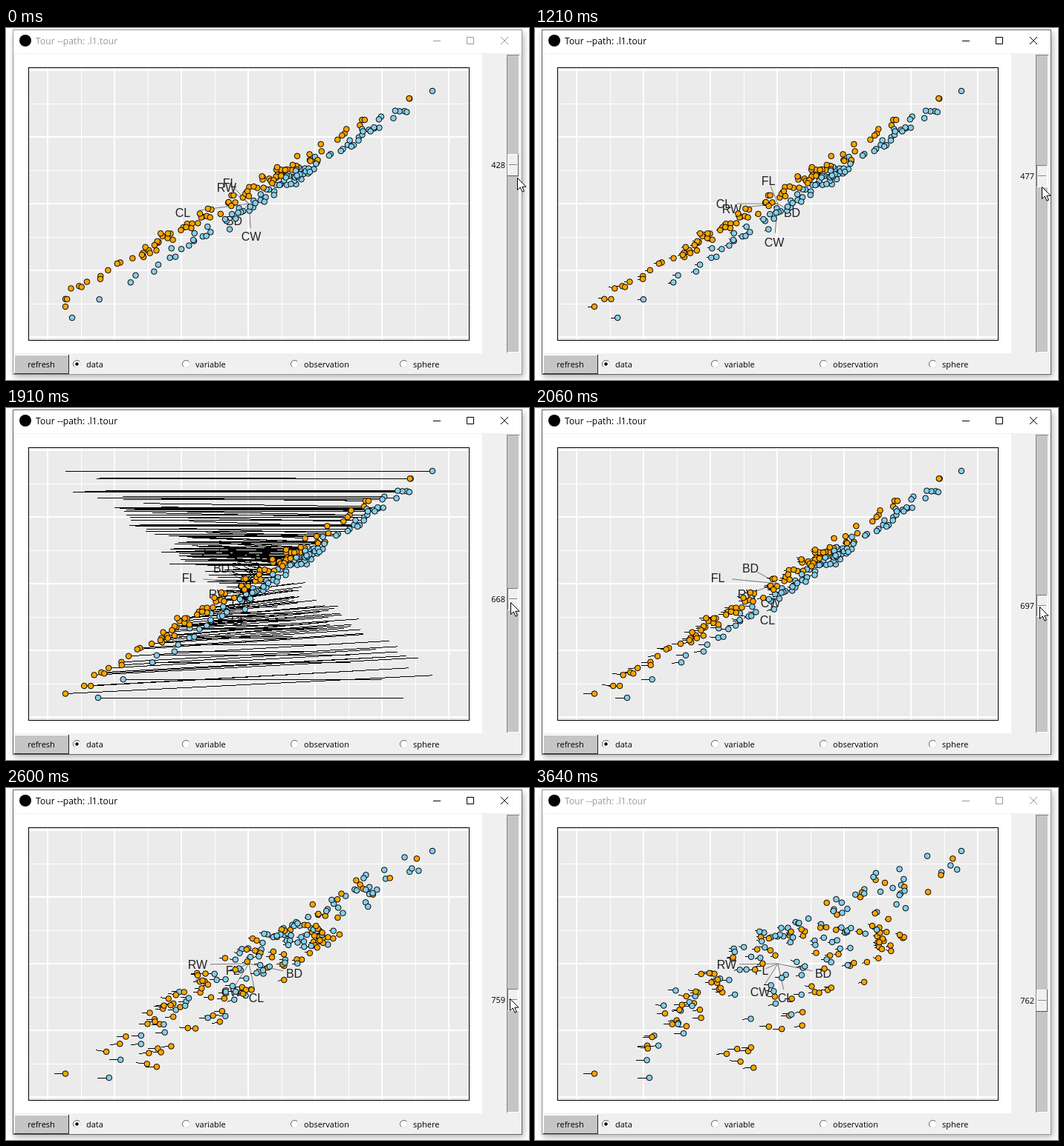
These frames come from a looping animation (704x475 px, 3740 ms). An HTML page:

```html
<!DOCTYPE html>
<html lang="en">
<head>
<meta charset="utf-8">
<title>Tour</title>
<style>
html, body { margin: 0; width: 100%; height: 100%; overflow: hidden; background: #fff; }
svg { display: block; width: 704px; height: 475px; }
text { font: 11px "Open Sans", "Noto Sans", sans-serif; fill: #000; }
#title { font-size: 12px; letter-spacing: .1px; }
#axes text { font: 16px "Liberation Sans", Arial, sans-serif; fill: #222; text-anchor: middle; }
#axes line { stroke: #777; }
#trails { stroke: #000; fill: none; }
#dots { stroke: #000; }
.crisp { shape-rendering: crispEdges; }
</style>
</head>
<body>
<svg viewBox="0 0 704 475">
  <defs><filter id="soft" x="-5%" y="-5%" width="110%" height="110%"><feGaussianBlur stdDeviation="4"/></filter></defs>
  <rect x="11" y="6" width="686" height="465" opacity=".3" filter="url(#soft)"/>
  <rect x="9.5" y="2.5" width="685" height="465" fill="#f0f0f0" id="frame"/>
  <rect x="10" y="3" width="684" height="31" fill="#fff"/>
  <circle cx="26" cy="17" r="8"/>
  <text id="title" x="40" y="22">Tour --path: .l1.tour</text>
  <path id="buttons" fill="none" d="M575 17.5h10M620.5 12.5h9v9h-9zM666 12l10 10M676 12l-10 10"/>
  <rect x="12" y="35" width="629" height="404" fill="#fff"/>
  <rect x="30.5" y="53.5" width="593" height="368" fill="#ebebeb"/>
  <g id="grid" stroke="#fff" class="crisp"></g>
  <g id="axes"></g>
  <path id="trails" class="crisp"/>
  <g id="dots"></g>
  <rect x="30.5" y="53.5" width="593" height="368" fill="none" stroke="#000"/>
  <g class="crisp" fill="none">
    <rect x="674" y="36" width="17" height="402" fill="#c5c5c5"/>
    <path d="M674.5 438V36.5H691" stroke="#858585"/>
    <path d="M690.5 37V437.5H675" stroke="#fff"/>
    <rect x="11" y="441" width="74" height="26" fill="#c5c5c5"/>
    <path d="M11.5 466V441.5H84" stroke="#fff"/>
    <path d="M84.5 441V466.5H11" stroke="#222"/>
  </g>
  <g id="thumb" class="crisp" fill="none">
    <rect x="675" y="-15" width="15" height="30" fill="#f0f0f0"/>
    <path id="lit" d="M675.5 14V-14.5H689"/>
    <path id="shade" d="M689.5 -15V14.5H675"/>
    <path d="M677 -.5H688" stroke="#808080"/>
    <path d="M677 .5H688" stroke="#fff"/>
  </g>
  <text id="value" x="672" text-anchor="end"></text>
  <text x="47.5" y="458" text-anchor="middle">refresh</text>
  <g id="radios"></g>
  <path id="cursor" d="M.5 .5V16.5L4.3 13L7 19.2L9.4 18.2L6.8 12.2H12Z" fill="#fff" stroke="#000"/>
</svg>
<script>
const LOOP = 3740, SVG = 'http://www.w3.org/2000/svg';
const PRESS = 670, FLIP = 1670, UNFLIP = 1910, SPLIT = 2300, LEAVE = 3080, BLUR = 3640;

// Moments at which the window repaints
const STEPS = [0, 120, 270, PRESS, 790, 940, 1060, 1210, 1370, 1520, FLIP, 1790,
  UNFLIP, 2060, 2180, SPLIT, 2460, 2600, 2720, 2840, 2960, LEAVE, BLUR];

// time, slider value, pointer x, pointer y
const DRAG = [
  [0, 428, 688, 202], [120, 428, 688, 196], [270, 428, 682, 181], [PRESS, 428, 682, 190],
  [1210, 477, 682, 214], [FLIP, 584, 679, 247], [UNFLIP, 668, 679, 262],
  [SPLIT, 743, 678, 278], [2600, 759, 678, 284], [LEAVE, 762, 676, 426]
];

// Key times of the labels and the pose reached at each
const POSES = [[PRESS, 0], [1210, 1], [UNFLIP, 2], [SPLIT, 2], [2600, 3]];
const LABELS = {
  FL: [[301, 209], [314, 206], [246, 229], [305, 246]],
  RW: [[297, 215], [265, 244], [286, 251], [258, 238]],
  CL: [[238, 249], [254, 237], [313, 286], [337, 283]],
  BD: [[307, 260], [346, 249], [290, 216], [388, 250]],
  CW: [[330, 281], [322, 289], [317, 263], [303, 275]]
};

// rank, height pairs for the two colours
const HEIGHTS = [
  [[0, 85], [2, 111], [22, 160], [32, 190], [55, 208], [78, 256], [91, 300], [97, 340], [99, 391]],
  [[0, 95], [1, 125], [9, 165], [18, 188], [40, 212], [70, 277], [86, 305], [95, 352], [99, 376]]
];

const $ = id => document.getElementById(id);
const clamp = (v, lo, hi) => Math.min(hi, Math.max(lo, v));
const lerp = (a, b, k) => a + (b - a) * k;
const ramp = (t, from, to) => clamp((t - from) / (to - from), 0, 1);

function set(el, attrs) {
  for (const k in attrs) el.setAttribute(k, attrs[k]);
}
function add(parent, tag, attrs, text) {
  const el = document.createElementNS(SVG, tag);
  set(el, attrs);
  if (text) el.textContent = text;
  return parent.appendChild(el);
}

// Linear interpolation in rows whose first entry is the position
function along(rows, t) {
  const i = clamp(rows.findIndex(r => r[0] >= t), -1, rows.length);
  if (i === 0) return rows[0];
  if (i < 0) return rows[rows.length - 1];
  const k = ramp(t, rows[i - 1][0], rows[i][0]);
  return rows[i].map((v, j) => lerp(rows[i - 1][j], v, k));
}

let seed = 29;
const rand = () => (seed = (seed * 16807) % 2147483647) / 2147483647;
const gauss = () => (rand() + rand() + rand() - 1.5) * 2;

const points = [];
HEIGHTS.forEach((heights, c) => {
  for (let i = 0; i < 100; i++) {
    const y = along(heights, i)[1];
    const g = rand() < .5 ? 0 : (c ? 1 : .75) + gauss() * .12;
    const p = { c, y, h: (y - 85) / 306, g, n: gauss(), m: gauss(), order: rand() };
    // The extremes span the plot exactly
    if (i === 0 || i === 99) Object.assign(p, { g: 0, m: 0, n: i && c ? -6 : 0 });
    points.push(p);
  }
});
points.sort((a, b) => a.order - b.order);

function place({ c, y, h, g, n, m }, t) {
  const flipped = t >= FLIP && t < UNFLIP;
  const split = 1 - (1 - ramp(t, SPLIT, LEAVE)) ** 1.4;
  let x, noise = 6 + 9 * split, shift = t < FLIP ? 0 : 10;
  if (flipped) {
    const twist = t < 1790 ? 1 : .1;
    x = 80 + 455 * h + c * (30 + 45 * h) - twist * g * (420 - 230 * h) * h;
    noise = -14;
    shift = -16;
  } else {
    const slope = 485 - 35 * ramp(t, PRESS, 1520);
    const line = 574 - slope * h - c * (14 + 45 * h);
    const bands = 574 - (800 - 380 * h) * h + c * (15 - 30 * h) + g * (10 + (440 - 350 * h) * h);
    x = lerp(line, bands, split);
  }
  return [clamp(x + n * noise, 80, 574), clamp(y + c * shift * h + m * (3 + 4 * split), 85, 391)];
}

for (let i = 0; i < 13; i++) {
  const x = 56 + 45 * i, y = 57 + 45 * i, w = i % 2 ? 1 : 2, o = i % 2 ? .5 : 0;
  add($('grid'), 'path', { d: `M${x + o} 54V421`, 'stroke-width': w });
  if (i < 9) add($('grid'), 'path', { d: `M31 ${y + o}H623`, 'stroke-width': w });
}
['data', 'variable', 'observation', 'sphere'].forEach((name, i) => {
  const x = 95.5 + Math.round(146.6 * i), g = $('radios');
  add(g, 'circle', { cx: x, cy: 453.5, r: 5, fill: '#fff', stroke: '#ddd' });
  add(g, 'path', { d: `M${x - 3.6} 457.1A5 5 0 0 1 ${x + 3.6} 449.9`, fill: 'none', stroke: '#666' });
  if (!i) add(g, 'circle', { cx: x, cy: 453.5, r: 2.2 });
  add(g, 'text', { x: x + 12.5, y: 458 }, name);
});
const axes = Object.entries(LABELS).map(([name, path]) => ({
  path,
  line: add($('axes'), 'line', { x1: 327, y1: 237 }),
  label: add($('axes'), 'text', {}, name)
}));
const dots = points.map(p => add($('dots'), 'circle', { r: 3.8, fill: p.c ? '#ffa500' : '#87ceeb' }));

function drawWindow(t) {
  const active = t >= PRESS && t < BLUR, ink = active ? '#000' : '#999';
  $('title').style.fill = ink;
  set($('buttons'), { stroke: ink });
  set($('frame'), { stroke: active ? '#666' : '#999' });

  const [, value, x, y] = along(DRAG, t);
  const mid = Math.round(185 + (value - 428) * .305);
  set($('thumb'), { transform: `translate(0 ${mid})` });
  set($('lit'), { stroke: active ? '#777' : '#fff' });
  set($('shade'), { stroke: active ? '#fff' : '#555' });
  set($('value'), { y: mid + 4 });
  $('value').textContent = Math.round(value);
  set($('cursor'), {
    transform: `translate(${Math.round(x)} ${Math.round(y)})`,
    visibility: t < LEAVE ? 'visible' : 'hidden'
  });
}

function drawAxes(t) {
  const pose = along(POSES, t)[1], i = Math.floor(pose), k = pose - i;
  for (const { path, line, label } of axes) {
    const to = path[Math.min(i + 1, 3)];
    const [x, y] = path[i].map((v, j) => lerp(v, to[j], k));
    set(line, { x2: lerp(327, x, .76), y2: lerp(237, y, .76) });
    set(label, { x, y: y + 6 });
  }
}

function drawPoints(t, last) {
  const jump = t >= FLIP && t <= UNFLIP;
  const tail = t <= PRESS ? 0 : t < FLIP ? 9 : 16;
  let d = '';
  points.forEach((p, i) => {
    const [x, y] = place(p, t);
    set(dots[i], { cx: x.toFixed(1), cy: y.toFixed(1) });
    const [u, v] = jump ? place(p, last) : [x - tail * p.h, y + p.m];
    if (tail) d += `M${u.toFixed(1)} ${v.toFixed(1)}L${x.toFixed(1)} ${y.toFixed(1)}`;
  });
  set($('trails'), { d });
}

let shown = -1;
function tick() {
  const now = performance.now() % LOOP;
  const i = STEPS.filter(t => t <= now).length - 1;
  if (i !== shown) {
    shown = i;
    drawWindow(STEPS[i]);
    drawAxes(STEPS[i]);
    drawPoints(STEPS[i], STEPS[Math.max(0, i - 1)]);
  }
  requestAnimationFrame(tick);
}
tick();
</script>
</body>
</html>
```
